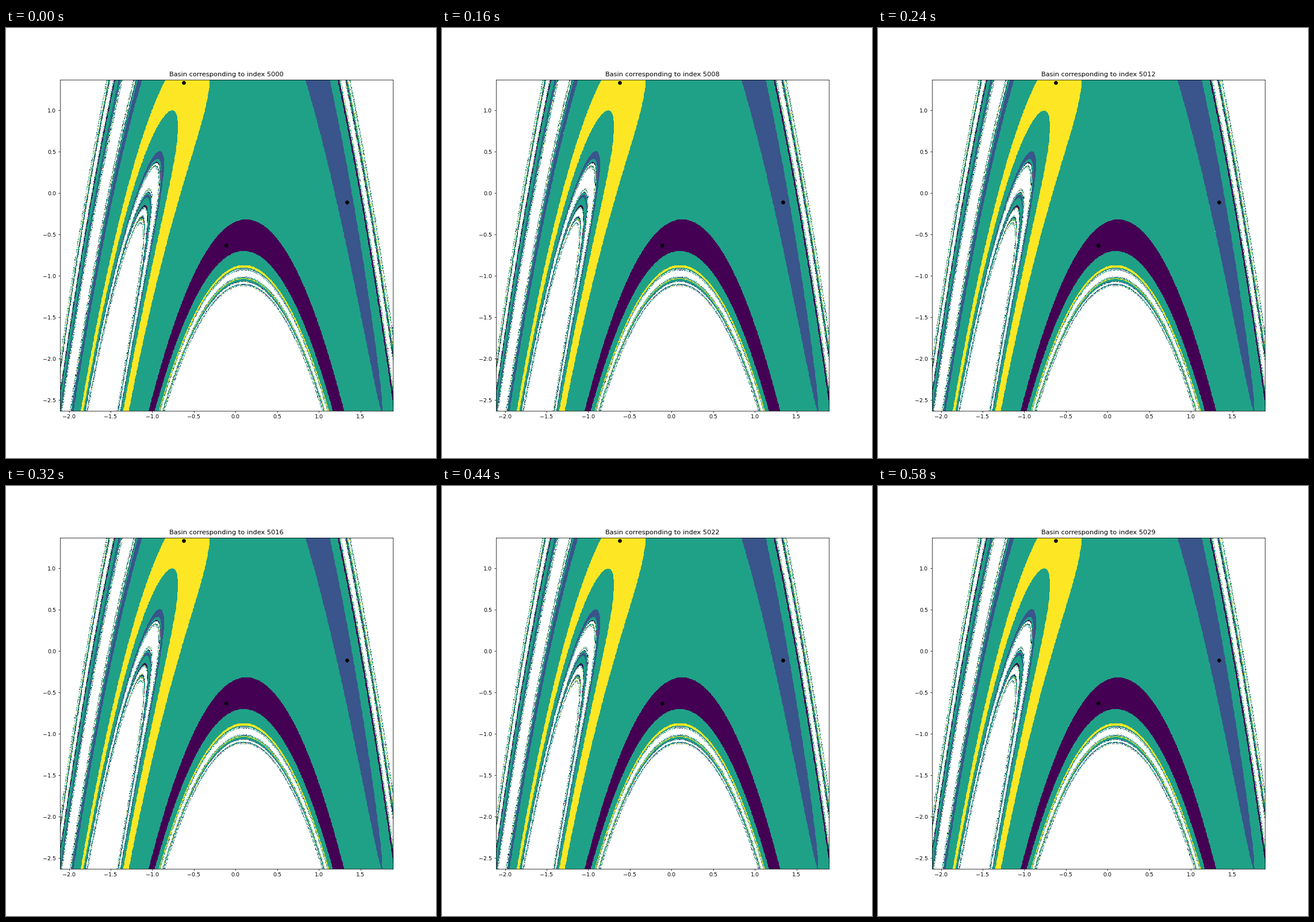
A matplotlib script for the animation above (600 ms loop, 748 px wide and 748 px high).

```python
import matplotlib.pyplot as plt
import numpy as np
from matplotlib.animation import FuncAnimation
from matplotlib.colors import ListedColormap

A, B = 0.947, -0.553    # Henon map in delay form
FRAMES, FIRST = 30, 5000
STEPS = 90              # multiple of the cycle length
GRID = 800
HALF = 2.0
CAPTURE = 0.04          # a point this close to an attractor stays with it

kicks = np.random.default_rng(7).uniform(-0.0003, 0.0003, FRAMES + STEPS)


def henon(x, y, kick=0.0):
    return 1 + kick - A * x * x + B * y, x


def three_cycle():
    x, y = -0.11, -0.627
    for _ in range(300):
        x, y = henon(x, y)
    points = []
    for _ in range(3):
        points.append((x, y))
        x, y = henon(x, y)
    # begin with the point of lowest y
    k = min(range(3), key=lambda i: points[i][1])
    return points[k:] + points[:k]


cycle = three_cycle()
cx, cy = cycle[0]
fixed = (B - 1 + np.sqrt((1 - B) ** 2 + 4 * A)) / (2 * A)
attractors = np.array(cycle + [(fixed, fixed)])

xs = np.linspace(cx - HALF, cx + HALF, GRID)
ys = np.linspace(cy - HALF, cy + HALF, GRID)
grid_x, grid_y = (g.ravel() for g in np.meshgrid(xs, ys))


def basin(frame):
    """Attractor number (1 to 4) reached from each grid point, 0 if it escapes."""
    result = np.zeros(GRID * GRID, np.uint8)
    x, y = grid_x, grid_y
    active = np.arange(x.size)
    for j in range(STEPS):
        x, y = henon(x, y, kicks[frame + j])
        if j % 3 < 2:
            continue
        keep = np.abs(x) < 10
        if j % 6 == 5:
            for n, (px, py) in enumerate(attractors, 1):
                caught = (x - px) ** 2 + (y - py) ** 2 < CAPTURE ** 2
                result[active[caught]] = n
                keep &= ~caught
        x, y, active = x[keep], y[keep], active[keep]
    return result.reshape(GRID, GRID)


basins = [basin(i) for i in range(FRAMES)]

# each basin takes its colour from the y value of its attractor
levels = attractors[:, 1]
shades = (levels - levels.min()) / (levels.max() - levels.min())
colors = ListedColormap(["white"] + [plt.cm.viridis(s) for s in shades])

fig, ax = plt.subplots(figsize=(11, 11), dpi=68)
image = ax.imshow(basins[0], cmap=colors, vmin=-0.5, vmax=4.5, origin="lower",
                  extent=(xs[0], xs[-1], ys[0], ys[-1]), aspect="auto",
                  interpolation="nearest")
ax.scatter(*zip(*cycle), c="black")
ax.set_xlim(xs[0], xs[-1])
ax.set_ylim(ys[0], ys[-1])
title = ax.set_title("")


def update(frame):
    image.set_data(basins[frame])
    title.set_text(f"Basin corresponding to index {FIRST + frame}")
    return image, title


anim = FuncAnimation(fig, update, frames=FRAMES, interval=20,
                     repeat=True, repeat_delay=0)
plt.show()
```
